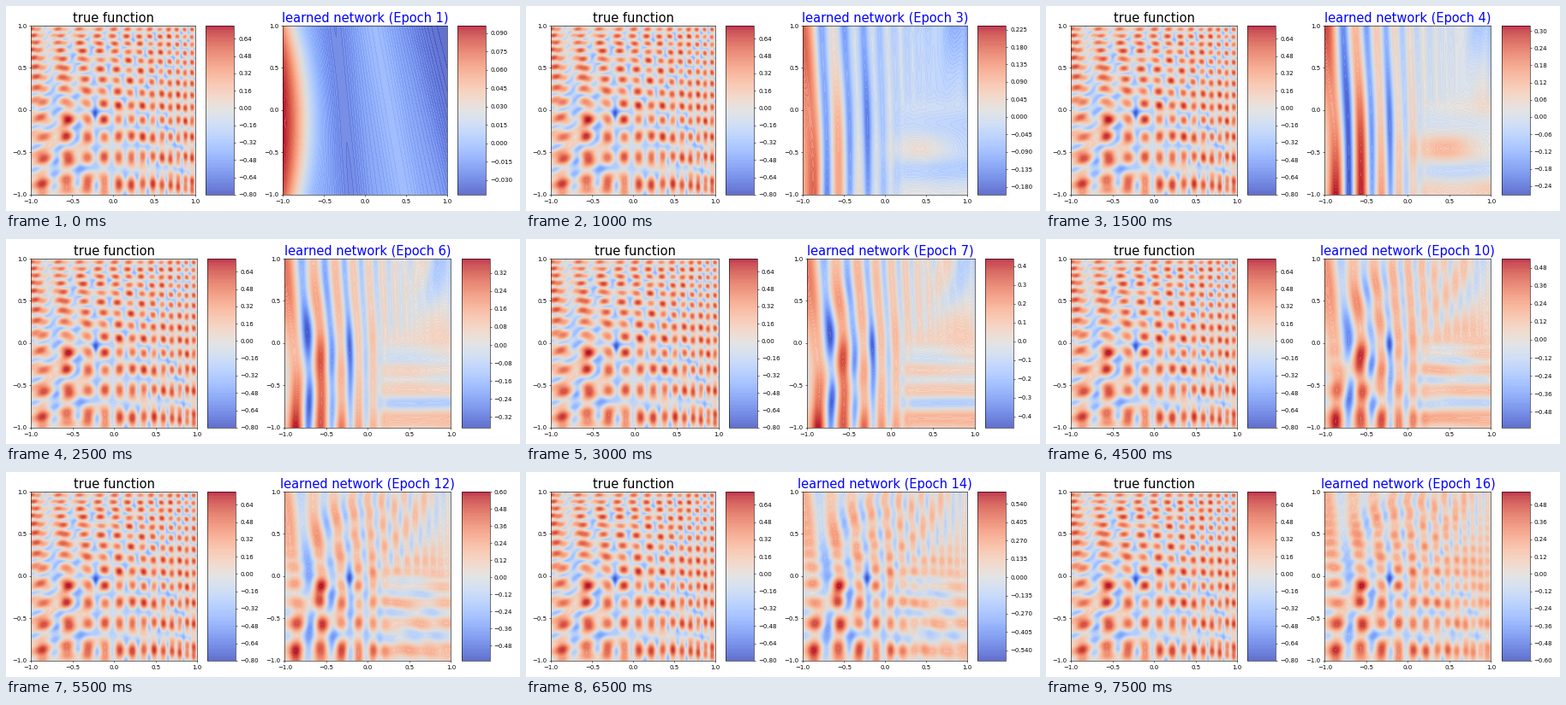
Animation of 600 by 240 pixels, one loop 8000 ms. Source, as a matplotlib script:

```python
import numpy as np
import matplotlib.pyplot as plt
from matplotlib.animation import FuncAnimation

W, H, DPI = 600, 240, 50
EPOCHS, HOLD = 16, 500
LEVELS_TRUE = (-0.80, 0.76, 0.02)

# per epoch: lowest level, highest level, level step, colorbar decimals
RANGES = [
    (-.042, .096, .0015, 3), (-.090, .165, .003, 3), (-.200, .235, .005, 3),
    (-.270, .318, .006, 2), (-.320, .360, .008, 3), (-.368, .384, .008, 2),
    (-.460, .440, .01, 1), (-.530, .440, .01, 1), (-.540, .450, .01, 1),
    (-.585, .540, .015, 2), (-.630, .615, .015, 3), (-.585, .600, .015, 2),
    (-.615, .630, .015, 3), (-.615, .630, .015, 3), (-.600, .585, .015, 2),
    (-.600, .570, .015, 2),
]
# decimals: axes width, left edge of the second panel
LAYOUT = {3: (192, 323.3), 2: (194, 325.4), 1: (195.6, 328)}

t = np.linspace(-1, 1, 171)
X, Y = np.meshgrid(t, t)

# crests of the chirp shared by both directions
CRESTS = [-.87, -.57, -.3, -.11, .06, .22, .36, .475, .59, .7, .79, .88, .955]
PHASE = np.polyfit(CRESTS, np.arange(-4, 9), 4)


def chirp(u):
    return np.cos(2 * np.pi * np.polyval(PHASE, u))


def bump(u, v, cx, cy, sx, sy):
    return np.exp(-((u - cx) / sx) ** 2 - ((v - cy) / sy) ** 2)


def sigmoid(u):
    return 1 / (1 + np.exp(-u))


def kernel(s):
    k = np.exp(-.5 * ((t[:, None] - t) / s) ** 2)
    return k / k.sum(axis=1, keepdims=True)


def blur(z, sx, sy):
    return kernel(sy) @ z @ kernel(sx).T


def fit(z, lo, hi, mid):
    """Stretch both sides of the mean so that the field fills [lo, hi]."""
    d = z - z.mean()
    up, down = d.clip(0) / d.max(), d.clip(None, 0) / d.min()
    z = mid + up * (hi - mid) - down ** 1.1 * (mid - lo)
    return z.clip(lo + 1e-6, hi - 1e-6)


def true_field():
    u = X + .07 * Y.clip(0) * (1 - X)
    v = Y + .07 * X * (1 - Y) * sigmoid(Y / .1)
    cols, rows = chirp(u), chirp(v)
    waves = np.sin(2 * np.pi * (2 * X + 4 * X * Y)) * np.cos(2 * np.pi * (4 * Y + 2 * X ** 2))
    streaks = np.cos(2 * np.pi * (2.6 * (X - .7 * Y) + .25)) * bump(X, Y, -.45, -.35, .4, .35)
    z = .17 * cols + .15 * rows + .13 * cols * rows + .14 * waves + .16 * streaks
    z -= .3 * bump(X, Y, -.23, -.07, .05, .12)
    z += .2 * bump(X, Y, -.58, -.35, .06, .25) + .15 * bump(X, Y, .06, .05, .05, .08)
    return z


def first_field():
    bend = .13 * (Y + .15) ** 2
    z = .12 * np.exp(-((X + 1.04 + bend) / .34) ** 2)
    z -= .013 * np.exp(-((X + .27 + .1 * Y) / .19) ** 2)
    z += .010 * np.exp(-((X - .3 + .18 * Y) / .2) ** 2)
    z -= .026 * sigmoid((X - .85 + .25 * Y) / .12)
    return z - .008


TRUE = true_field()


def learned_field(epoch):
    lo, hi, _, _ = RANGES[epoch - 1]
    keys = [4, 6, 8, 10, 12, 16]
    sx = np.interp(epoch, keys, [.052, .044, .038, .032, .026, .020])
    sy = np.interp(epoch, keys, [.45, .20, .13, .085, .055, .036])
    flat = np.interp(epoch, keys, [.5, .3, .2, .13, .06, .022])
    tall = np.interp(epoch, keys, [.12, .075, .06, .05, .042, .034])
    right = sigmoid((X - .17) / .04) * sigmoid((.08 - Y) / .05)
    z = (1 - right) * blur(TRUE, sx, sy) + right * blur(TRUE, flat, tall)
    early = np.interp(epoch, [4, 8], [1, 0])
    z += early * .06 * bump(X, Y, .45, -.45, .35, .15)
    z -= early * .03 * bump(X, Y, .55, -.9, .5, .2)
    mid = np.interp(epoch, [4, 6, 8, 16], [.03, .03, .05, .07])
    z = fit(z, lo, hi, mid)
    if epoch < 4:
        start = first_field()
        start = lo + (start - start.min()) / np.ptp(start) * (hi - lo)
        mix = (epoch - 1) / 3
        z = (1 - mix) * start + mix * z
    return z.clip(lo + 1e-6, hi - 1e-6)


def steps(lo, hi, step):
    return np.arange(round(lo / step), round(hi / step) + 1) * step


def panel(ax, cax, z, levels, title, color):
    ax.clear()
    cax.clear()
    cs = ax.contourf(X, Y, z, levels=levels, cmap="coolwarm", alpha=.8)
    fig.colorbar(cs, cax=cax)
    ax.set_xticks(np.linspace(-1, 1, 5))
    ax.set_yticks(np.linspace(-1, 1, 5))
    ax.set_title(title, fontsize=21, color=color)


def place(ax, cax, x, width):
    y, height = 19.2 / H, 197.8 / H
    ax.set_position([x / W, y, width / W, height])
    cax.set_position([(x + width * 1.0625) / W, y, 33 / W, height])


fig = plt.figure(figsize=(W / DPI, H / DPI), dpi=DPI)
ax1, cax1, ax2, cax2 = (fig.add_axes([0, 0, 1, 1], label=str(i)) for i in range(4))
panel(ax1, cax1, fit(TRUE, -.8, .76, .10), steps(*LEVELS_TRUE), "true function", "black")


def update(frame):
    lo, hi, step, decimals = RANGES[frame]
    epoch = frame + 1
    panel(ax2, cax2, learned_field(epoch), steps(lo, hi, step),
          f"learned network (Epoch {epoch})", "blue")
    width, x2 = LAYOUT[decimals]
    place(ax1, cax1, 29.3, width)
    place(ax2, cax2, x2, width)


anim = FuncAnimation(fig, update, frames=EPOCHS, interval=HOLD,
                     init_func=lambda: None, repeat=True, repeat_delay=0)
plt.show()
```
